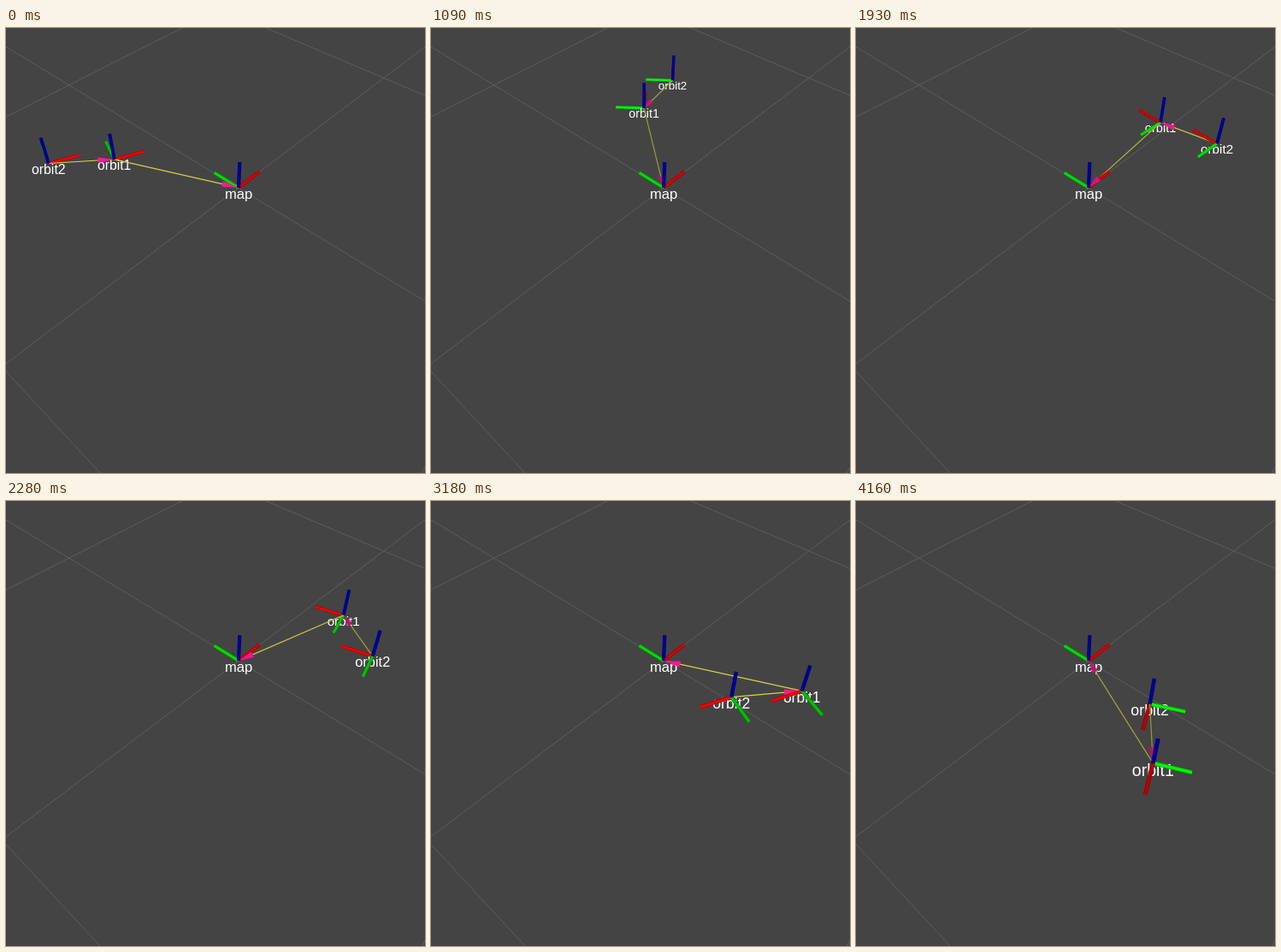
An HTML page with a canvas that plays this animation: 490x521 px, repeating every 4230 ms.

```html
<!DOCTYPE html>
<html>
<head>
<meta charset="utf-8">
<style>
html, body { margin: 0; width: 100%; height: 100%; overflow: hidden; background: #444; }
canvas { display: block; }
</style>
</head>
<body>
<canvas id="stage" width="490" height="521"></canvas>
<script>
const ctx = document.getElementById('stage').getContext('2d');
const RAD = Math.PI / 180, LOOP = 4230, FOCAL = 629;
const AXIS = 0.12, AXIS_WIDTH = 0.0125, HEAD = 0.062, HEAD_RADIUS = 0.011;
const RED = [255, 0, 0], GREEN = [0, 255, 0], BLUE = [0, 0, 255];
const YELLOW = [214, 214, 74], PINK = [255, 25, 153];

// Camera space: right, down, forward.
const PITCH = 49.5 * RAD, YAW = 42.6 * RAD;
const ORIGIN = [0.0839, -0.2285, 1.955];
const heading = h => [Math.sin(h), -Math.cos(h) * Math.sin(PITCH), Math.cos(h) * Math.cos(PITCH)];
const X = heading(YAW), Y = heading(YAW - Math.PI / 2);
const Z = [0, -Math.cos(PITCH), -Math.sin(PITCH)];

// Time in ms, orbit angle in degrees, picture steps until the next key.
const KEYS = [
  [0, -24, 9], [600, 13.4, 14], [1580, 65.4, 10], [2280, 105.5, 8],
  [2840, 137.3, 11], [3590, 176.9, 8], [4160, 205.5, 1], [LOOP, 205.5, 1]
];

const GRID = [
  [0, 393, 490, 22], [0, 22, 490, 320], [0, 104, 206, 0],
  [304, 0, 490, 79], [0, 402, 110, 521], [486.5, 521, 490, 514]
];

const add = (a, b, k = 1) => a.map((v, i) => v + b[i] * k);
const ground = (x, y) => add(add([0, 0, 0], X, x), Y, y);
const project = p => [245 + FOCAL * p[0] / p[2], 260.5 + FOCAL * p[1] / p[2]];
const tint = (color, k) => `rgb(${color.map(c => Math.round(c * k))})`;
// Surfaces seen end-on receive less light.
const light = dir => Math.pow(1 - dir[2] * dir[2], 0.6);

function orbitAngle(t) {
  const i = KEYS.findIndex((key, n) => t < KEYS[n + 1][0]);
  const [start, from, steps] = KEYS[i], [end, to] = KEYS[i + 1];
  const part = Math.floor((t - start) / (end - start) * steps + 1e-6) / steps;
  return (from + (to - from) * part) * RAD;
}

function stroke(a, b, width, style) {
  ctx.beginPath();
  ctx.moveTo(...a);
  ctx.lineTo(...b);
  ctx.lineWidth = width;
  ctx.strokeStyle = style;
  ctx.stroke();
}

function axis(items, base, dir, color) {
  const tip = add(base, dir, AXIS), z = (base[2] + tip[2]) / 2;
  items.push([z, () => {
    const a = project(base), b = project(tip);
    const width = AXIS_WIDTH * FOCAL / z, k = light(dir);
    stroke(a, b, width, tint(color, k * 0.75));
    stroke(a, b, width * 0.6, tint(color, k));
  }]);
}

function label(items, base, text) {
  items.push([base[2], () => {
    const [x, y] = project(base);
    ctx.font = `${32.4 / base[2]}px "Liberation Sans", Arial, sans-serif`;
    ctx.fillStyle = '#fff';
    ctx.fillText(text, x, y + 25.2 / base[2]);
  }]);
}

function arrow(items, child, parent) {
  const span = add(parent, child, -1), length = Math.hypot(...span);
  const dir = span.map(v => v / length), k = light(dir);
  const neck = add(parent, dir, -HEAD);
  items.push([(child[2] + neck[2]) / 2, () =>
    stroke(project(child), project(neck), 1.2, tint(YELLOW, k))]);
  items.push([(neck[2] + parent[2]) / 2, () => {
    const a = project(neck), b = project(parent);
    const dx = b[0] - a[0], dy = b[1] - a[1];
    const r = HEAD_RADIUS * FOCAL / neck[2] / Math.hypot(dx, dy);
    ctx.beginPath();
    ctx.moveTo(...b);
    ctx.lineTo(a[0] - dy * r, a[1] + dx * r);
    ctx.lineTo(a[0] + dy * r, a[1] - dx * r);
    ctx.fillStyle = tint(PINK, k);
    ctx.fill();
  }]);
}

function frame(items, base, turn, name) {
  const c = Math.cos(turn), s = Math.sin(turn);
  axis(items, base, ground(c, s), RED);
  axis(items, base, ground(-s, c), GREEN);
  axis(items, base, Z, BLUE);
  label(items, base, name);
}

function draw(t) {
  const a = orbitAngle(t), items = [];
  const one = add(ORIGIN, ground(Math.sin(a), Math.cos(a)), 0.497);
  // The second orbit turns three times as fast inside the first one's frame.
  const b = Math.PI / 2 - 2 * a;
  const two = add(one, ground(Math.cos(b), Math.sin(b)), 0.248);

  ctx.fillStyle = '#444';
  ctx.fillRect(0, 0, 490, 521);
  for (const [x1, y1, x2, y2] of GRID) stroke([x1, y1], [x2, y2], 1, '#5c5c5c');

  arrow(items, two, one);
  arrow(items, one, ORIGIN);
  frame(items, ORIGIN, 0, 'map');
  frame(items, one, a, 'orbit1');
  frame(items, two, a, 'orbit2');
  items.sort((p, q) => q[0] - p[0]).forEach(item => item[1]());
}

ctx.textAlign = 'center';
const begin = performance.now();
function tick() {
  draw((performance.now() - begin) % LOOP);
  requestAnimationFrame(tick);
}
tick();
</script>
</body>
</html>
```
